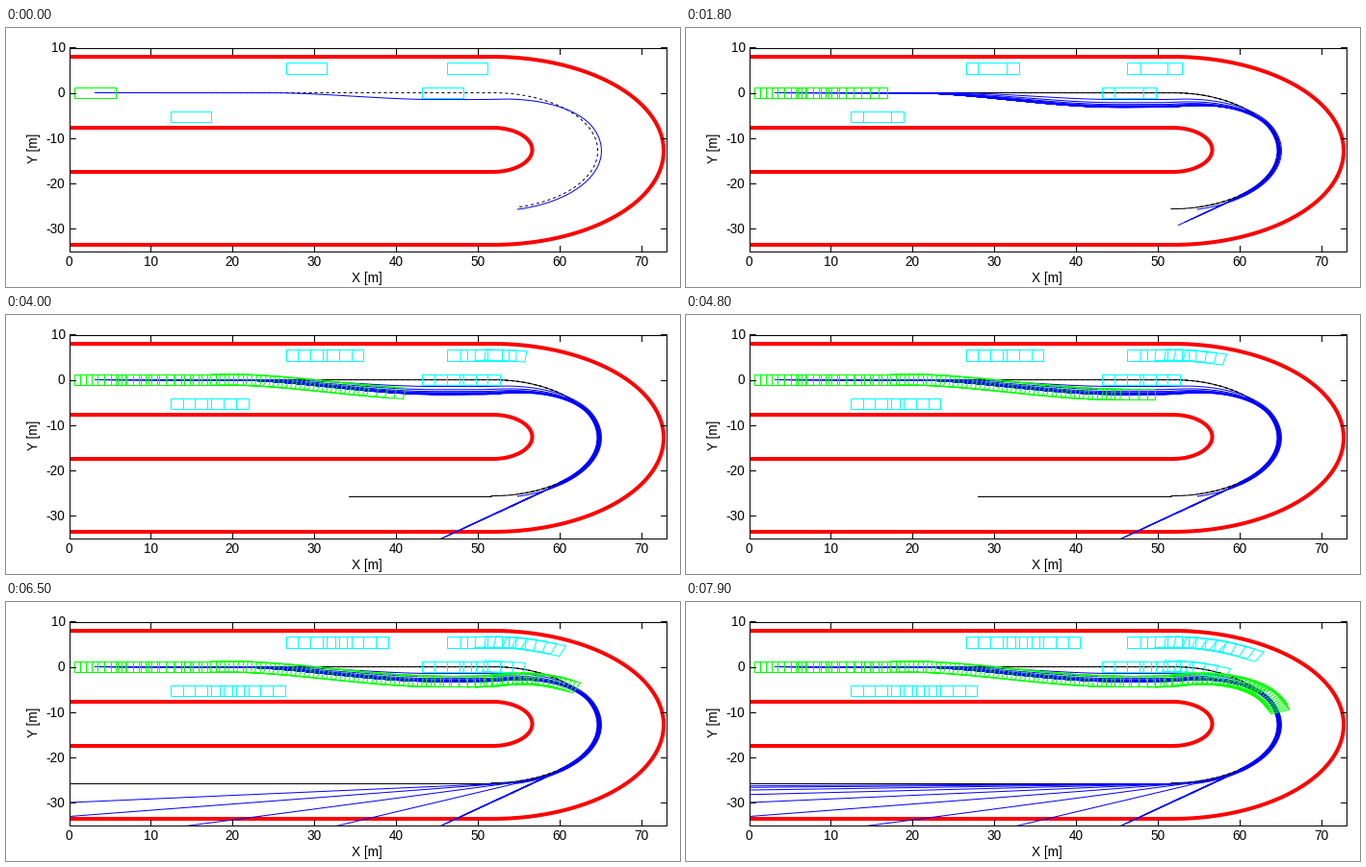
A matplotlib script that plays this animation: 700x270 px, repeating every 8000 ms.

```python
import numpy as np
import matplotlib.pyplot as plt
from matplotlib.animation import FuncAnimation
from matplotlib.patches import Rectangle

FRAMES, INTERVAL = 80, 100
PX = 0.72                               # one pixel in points at 100 dpi
LEFT, TOP, RIGHT, BOTTOM = 65, 20, 685, 232
KX, KY = (RIGHT - LEFT) / 73, (BOTTOM - TOP) / 45
BEND, R = 51.8, 12.85                   # start and radius of the turn, metres
ROAD_END = BEND + np.pi * R
TEXT = dict(size=9.8, va="baseline")

plt.rcParams["font.family"] = "Liberation Sans"
rng = np.random.default_rng(4)

fig = plt.figure(figsize=(7, 2.7), dpi=100, facecolor="white")
ax = fig.add_axes([0, 0, 1, 1])
ax.set_xlim(-0.5, 699.5)
ax.set_ylim(269.5, -0.5)
ax.axis("off")

frame = Rectangle((LEFT, TOP), RIGHT - LEFT, BOTTOM - TOP, fill=False,
                  ec="black", lw=PX, zorder=6)
ax.add_patch(frame)

timed = []


def to_px(x, y):
    return LEFT + KX * x, 67 - KY * y


def ease(t):
    t = np.clip(t, 0, 1)
    return t * t * (3 - 2 * t)


def draw(x, y, color, birth=0, width=1, zorder=3, **style):
    line, = ax.plot(x, y, color=color, lw=width * PX, zorder=zorder, **style)
    line.set_clip_path(frame)
    timed.append((birth, line))


def track(s, lane=0):
    """Point at distance s along the centre line, shifted sideways."""
    a = np.clip((s - BEND) / R, 0, np.pi)
    x = np.minimum(s, BEND) + (R + lane) * np.sin(a) - np.maximum(0, s - ROAD_END)
    return np.array([x, (R + lane) * np.cos(a) - R])


def swerve(s, depth=3.2, bulge=0.35):
    """Sideways shift that passes the parked car and swings back."""
    start = 19 + 3 * (3.2 - depth)
    return (-depth * ease((s - start) / (45 - start))
            + (depth + bulge) * ease((s - 50) / 17))


def box(s, lane, color, birth, zorder):
    ux, uy = track(s + 0.05, lane(s + 0.05)) - track(s - 0.05, lane(s - 0.05))
    size = np.hypot(ux, uy)
    ux, uy = ux / size, uy / size
    a = 2.5 * np.array([-1, 1, 1, -1, -1])
    b = 1.2 * np.array([-1, -1, 1, 1, -1])
    x, y = track(s, lane(s))
    draw(*to_px(x + a * ux - b * uy, y + a * uy + b * ux),
         color, birth, zorder=zorder)


# axes
def tick(x, y, dx, dy):
    ax.plot([x, x + dx], [y, y + dy], color="black", lw=PX, zorder=6)


for v in range(0, 80, 10):
    x = to_px(v, 0)[0]
    tick(x, BOTTOM, 0, -6)
    tick(x, TOP, 0, 6)
    ax.text(x, 248, str(v), ha="center", **TEXT)
for v in range(10, -40, -10):
    y = to_px(0, v)[1]
    tick(LEFT, y, 6, 0)
    tick(RIGHT, y, -6, 0)
    ax.text(61, y + 5, str(v), ha="right", **TEXT)
ax.text(374, 264, "X [m]", ha="center", **TEXT)
ax.text(28, 125, "Y [m]", size=9.8, ha="center", va="center", rotation=90)

# road edges
phi = np.linspace(0, np.pi, 120)
for cy, rx, ry in ((127.5, 177.5, 98), (126.5, 41, 23)):
    draw(np.r_[LEFT, 505 + rx * np.sin(phi), LEFT],
         np.r_[cy - ry, cy - ry * np.cos(phi), cy + ry],
         "red", width=4, zorder=2)

# car: waits, speeds up, then brakes for the turn
n = np.arange(FRAMES)
speed = 0.68 + 0.42 * ease((n - 5) / 16) - 0.75 * ease((n - 42) / 36)
car = 3.18 + np.cumsum(np.where(n > 5, speed, 0))
for k in [0, *range(6, FRAMES)]:
    box(car[k], swerve, "lime", k, 5)


# other vehicles advance in equal steps
def vehicle(x0, lane, start, period, step=1.5, first=1):
    box(x0, lambda s: lane, "cyan", 0, 4)
    for k in range(first, 14):
        box(x0 + step * k, lambda s: lane, "cyan",
            np.ceil(start + period * k), 4)


vehicle(29.0, 5.4, 0, 12.5)
vehicle(14.9, -5.3, 2, 10.5)
vehicle(45.7, 0, 7.2, 10.25)
vehicle(48.7, 5.4, 0, 6.7, step=0.84, first=2)


# reference path, its far end growing with time
def horizon(k):
    return 89.2 + 0.79 * max(0, k - 14) + 2.3 * max(0, k - 54)


def reference(s0, s1, birth, **style):
    draw(*to_px(*track(np.linspace(s0, s1, 300))), "black", birth, **style)


for k in (0, 6):
    reference(car[k], horizon(k), k, dashes=(3, 3), dash_capstyle="butt")
reference(car[10], horizon(10), 10)
for k in range(15, 70):
    reference(horizon(k - 1), horizon(k), k)


# planned paths, each leaving the turn on a tangent
def plan(birth, depth, bulge, leave, run=0):
    s = np.linspace(car[0], leave, 300)
    x, y = track(s, swerve(s, depth, bulge))
    a = (leave - BEND) / R
    x, y = np.r_[x, x[-1] + run * np.cos(a)], np.r_[y, y[-1] - run * np.sin(a)]
    draw(*to_px(x, y), "blue", birth)


def leave_at(degrees):
    return ROAD_END - R * np.radians(degrees)


plan(0, 1.5, 0.45, horizon(0))
for k in range(1, 6):
    plan(k, 3.2 - 1.7 * 0.6 ** k, rng.uniform(-0.1, 0.3), leave_at(40))
for k in range(6, FRAMES, 5):
    plan(k, rng.uniform(3.1, 3.3), rng.uniform(-0.1, 0.35), leave_at(40))
for k in range(9, 29):
    plan(k, 3.2, 0.2, leave_at(40), k - 8)
for k in range(1, 9):
    plan(np.ceil(54 + 2.4 * k), 3.2, 0.2, leave_at(40 * 0.58 ** k), 80)


def update(k):
    for birth, line in timed:
        line.set_visible(birth <= k)
    return []


anim = FuncAnimation(fig, update, frames=FRAMES, interval=INTERVAL,
                     init_func=lambda: update(0), repeat=True, repeat_delay=0)
plt.show()
```
